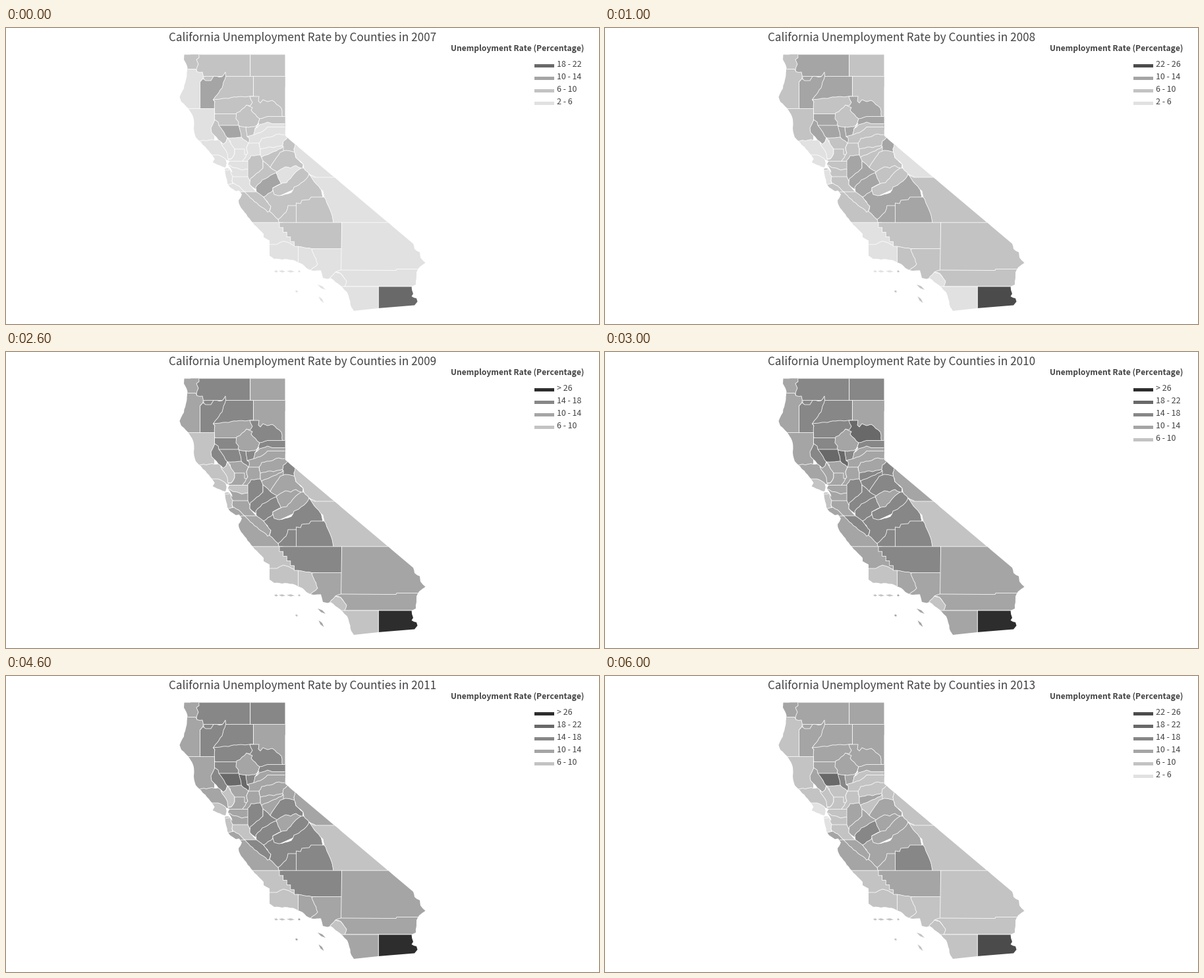
Animation, 900 px wide and 450 px high, one loop 7000 ms. Source, as a matplotlib script:

```python
import math
import random

import matplotlib.pyplot as plt
from matplotlib.animation import FuncAnimation
from matplotlib.patches import Polygon, Rectangle

W, H, DPI = 900, 450, 100
PX = 72 / DPI  # points per pixel
FONT = "Noto Sans CJK JP"
INK = "#444444"
FIRST_YEAR, YEARS = 2007, 7
CLIMB = (0, 0.3, 0.85, 1)   # from the first rate to the peak
EASING = (0, 0.2, 0.6, 1)   # from the peak to the last rate

rng = random.Random(4)
fig = plt.figure(figsize=(W / DPI, H / DPI), dpi=DPI, facecolor="white")
ax = fig.add_axes([0, 0, 1, 1])
ax.set(xlim=(0, W), ylim=(H, 0))
ax.axis("off")


def pairs(flat):
    return list(zip(flat[::2], flat[1::2]))


def rough(points):
    """Wrinkle natural borders; surveyed (upright, level, long) ones stay straight."""
    out = []
    for (x0, y0), (x1, y1) in zip(points, points[1:] + points[:1]):
        dx, dy = x1 - x0, y1 - y0
        size = math.hypot(dx, dy)
        out.append((x0, y0))
        if dx and dy and size < 30:
            n = int(size // 4)
            for k in range(1, n):
                d = rng.uniform(-0.7, 0.7) / size
                out.append((x0 + dx * k / n - dy * d, y0 + dy * k / n + dx * d))
    return out


def box(x0, y0, x1, y1):
    return x0, y0, x1, y0, x1, y1, x0, y1


def stairs(x0, y0, x1, y1, n):
    flat = []
    for k in range(n):
        x, y = x0 + (x1 - x0) * k / n, y0 + (y1 - y0) * k / n
        flat += [x, y, x + (x1 - x0) / n, y]
    return flat


NORTH_COAST = (423.5, 40.5, 270.5, 40.5, 270, 48, 275.5, 60, 273, 79, 270, 92,
               263.5, 105, 266, 112, 277, 122.5, 284, 135, 285.5, 147, 285, 152,
               288, 166, 296, 173.5, 305, 184, 313, 193, 317, 199, 314, 204,
               325, 209, 333, 212)
BAY = (335, 206, 333, 200, 340, 202, 337, 207, 341, 213, 344, 221, 337, 213,
       332.5, 214)
CENTRAL_COAST = (333, 222, 336, 236, 340, 242, 349, 248, 354, 247, 358, 253,
                 353, 262, 355, 270, 362, 280, 375, 296, 384, 306, 391, 313,
                 391, 318, 400, 323, 400, 346, 407, 351, 435, 352.5)
SOUTH_COAST = (450, 359, 456, 365, 467, 369, 478, 368.5, 481, 380, 488, 381.5,
               493, 380, 511, 394.5, 518, 402, 522.5, 416, 524, 424, 528, 430)
EAST = (565, 426, 620, 421.5, 624.5, 416, 623, 411, 615.5, 408, 618, 404,
        615.5, 393, 622, 390, 623, 371, 627, 364, 636.5, 357, 629, 349,
        628, 341, 620, 336, 618, 328, 423.5, 164)

state = Polygon(rough(pairs(NORTH_COAST + BAY + CENTRAL_COAST + SOUTH_COAST
                            + EAST)), fc="none", ec="none")
ax.add_patch(state)
areas = []


def county(rates, *flat):
    """Rates are the first, peak and last percentages.

    Outlines may run past the coast or under counties added later.
    """
    patch = Polygon(rough(pairs(flat)), ec="white", lw=0.8 * PX,
                    joinstyle="round", snap=False)
    ax.add_patch(patch)
    patch.set_clip_path(state)
    areas.append((patch, rates))


def island(rates, x, y, dx, dy):
    """A lens about (x, y) with half axis (dx, dy)."""
    k = 1.7 / math.hypot(dx, dy)
    patch = Polygon([(x - dx, y - dy), (x + dy * k, y - dx * k),
                     (x + dx, y + dy), (x - dy * k, y + dx * k)], lw=0)
    ax.add_patch(patch)
    areas.append((patch, rates))


# Rate histories shared by several counties
HARD = (9, 17, 13)
LATE = (7, 15, 11)
STEADY = (7, 13, 11)
FOOTHILL = (5, 11.5, 7)
METRO = (5, 12, 9)
MILD = (5, 10.5, 8.5)
LOW = (4, 10.5, 8.5)
COASTAL = (4, 9, 7)
RICH = (4, 8.5, 5.5)
RISEN = (5, 13, 11)

# North
county(HARD, *box(280, 30, 370.7, 90))
county((7, 15, 13.5), *box(370.7, 30, 430, 90))
county(HARD, *box(300, 73.5, 375.5, 115))
county(STEADY, *box(375.5, 73.5, 430, 150))
county(STEADY, 260, 30, 294, 30, 293, 45, 289, 48, 292, 55, 289, 63, 290, 70,
       260, 70)
county(FOOTHILL, 250, 62.5, 288, 62.5, 290, 66.5, 298, 67, 299, 77, 294.5, 82,
       294.5, 130, 250, 130)
county((10.5, 17, 13), 294.5, 82, 299, 77, 303, 80, 311, 80, 315, 73.5, 328, 74,
       333, 67, 333.5, 73.5, 328, 91, 318, 104, 314.5, 109, 317, 112, 317, 130,
       294.5, 130)
county(LATE, 317, 112, 314.5, 109, 325, 108, 350, 105, 376, 104, 376, 140,
       316.5, 140)
county((9, 18.5, 13.5), 370, 104, 384, 104, 383, 111, 386, 114, 390, 109,
       397, 112, 404, 110, 418, 122, 420, 145, 365, 145, 365, 118, 371, 118,
       374, 113)
county(MILD, *box(250, 122.5, 316.5, 180))
county(HARD, *box(316.5, 130.5, 360, 155))
county(STEADY, 365, 117, 374, 121, 372, 125, 385, 138, 383, 144, 377, 155,
       353.5, 155, 353, 143, 349, 138, 350, 129, 355, 127)
county(HARD, 385, 138, 397, 134.5, 430, 134.5, 430, 155, 383, 155, 383, 144)

# Central valley and foothills
county((11, 19, 18.2), 318, 148, 353.5, 148, 360, 160, 360, 172, 336, 172)
county((9, 16, 12), 317, 139.5, 322, 143, 323, 148, 336, 167, 334, 173, 330, 180,
       318, 180, 322, 170, 312, 159, 311, 152, 314, 146)
county(HARD, 364, 150.5, 377, 150, 384, 145, 378, 153, 378, 172, 364, 172)
county((9, 19, 15), 353.5, 149, 364, 150.5, 366, 165, 370, 167, 370, 180,
       357, 175, 356, 158)
county(FOOTHILL, 376, 161, 378, 153, 385, 147, 397, 143, 404, 145.5, 430, 145.5,
       430, 170, 376, 170)
county(FOOTHILL, 366, 165, 386, 159, 397, 150.5, 430, 150.5, 430, 180, 368, 180,
       369, 167)
county(METRO, 384, 175, 388, 168, 400, 166, 414, 161, 430, 163, 430, 190,
       386, 190)
county(LOW, 280, 173.5, 308, 170.5, 322, 170, 330, 177, 338, 177, 338, 205,
       280, 205)
county(METRO, 336, 167, 357, 166, 368, 175, 365, 182, 367, 190, 364, 198,
       350, 198, 340, 171)
county((4, 10.2, 8), 326, 174, 330, 176.5, 334, 173, 336, 167, 347, 184, 347, 191,
       342, 199, 337, 199, 336, 191)
county(METRO, 347, 184, 362, 184, 362, 192, 367, 193, 367, 210, 337, 210,
       337, 200, 342, 199, 347, 191)
county(METRO, 368, 175, 384, 175, 386, 184, 386, 198, 372, 200, 367, 204,
       358, 204, 367, 190, 365, 182)
county((5.5, 14.2, 11), 386, 184, 398, 181, 406, 182, 421, 178, 421, 200, 386, 200)
county((9, 15, 9), 420, 178, 421, 172, 430, 164, 445, 180, 437, 184, 439, 195,
       420, 195)
county((8, 14.5, 9.5), 388, 196, 402, 190, 418, 183, 421, 180, 421, 195, 405, 220,
       388, 210)
county(LATE, 401, 212, 405, 205, 416, 189, 424, 186, 439, 189, 440, 197, 451, 207,
       452, 225, 405, 225)
county((4, 10.4, 9.9), 437, 184, 439, 175, 450, 170, 510, 227, 505, 235, 463, 235,
       452, 213, 451, 207, 440, 197)

# Bay area
county(RICH, 305, 193, 322, 193, 333, 199, 336, 205, 334, 213, 305, 215)
county(MILD, *box(335, 202.5, 368, 230))
county(FOOTHILL, 335, 207, 344, 212, 351, 213, 358, 216, 370, 213, 370, 232,
       338, 232)
county(RICH, 325, 213, 338, 213, 345, 227, 343, 232, 346, 240, 325, 245)
county((5, 9, 5.5), *box(325, 213, 338, 216))
county((5.8, 10.8, 6.5), 344, 226, 367, 226, 371, 229, 370, 238, 380, 249,
       375, 260, 360, 255, 345, 240, 343, 232)
county(RISEN, 335, 239, 346, 236, 353, 240, 362, 249, 358, 251, 340, 255)
county(HARD, 367, 201, 372, 194, 386, 193, 390, 202, 390, 220, 371, 235, 367, 226)
county(HARD, 371, 229, 390, 213, 390, 202, 401, 212, 415, 220, 385, 250, 370, 238)
county((11, 17, 14.5), 379, 242, 389, 231, 410, 220, 419, 236, 405, 243, 405, 260,
       390, 262, 380, 249)

# Sierra, southern valley and coast
county(RISEN, 410, 220, 424, 211, 432, 213, 440, 209, 448, 213, 443, 230, 419, 240,
       413, 228)
county((7, 15, 13.5), 405, 243, 419, 236, 426, 235, 437, 222, 448, 213, 452, 213,
       460, 222, 460, 235, 405, 260)
county(STEADY, 340, 251, 362, 249, 400, 260, 420, 300, 340, 300)
county(LATE, 362, 249, 380, 249, 391, 257, 402, 271, 400, 278, 397, 280, 391, 274,
       377, 264)
county(HARD, 391, 257, 405, 247, 407, 253, 414, 255, 433, 250, 437, 242, 444, 239,
       456, 229, 460, 222, 475, 230, 490, 300, 415, 300, 413, 291, 400, 279,
       402, 271)
county(HARD, 413, 291, 425, 280, 428, 270, 450, 270, 450, 300, 415, 300)
county((9, 17, 15), 440.5, 266, 447, 267, 449, 262, 460, 261, 463, 257, 490, 257,
       500, 300, 440.5, 300)
county((5, 9, 7), 460, 222, 468, 227, 505, 227, 600, 300, 497, 300, 494, 282,
       483, 257, 481, 248, 468, 234)
county((4, 10.2, 8), 365, 295.8, 420, 295.8, 450, 335, 360, 335)

# South
county(COASTAL, 395, 329, 411, 329, 421, 324, 443, 332, 450, 332, 444, 360,
       395, 360)
county(MILD, *box(443.5, 332, 475, 372))
county(METRO, 464, 336, 473, 359, 462, 368, 470, 390, 510, 390, 515, 330)
county((7, 16, 11.5), 415, 295.8, 509.5, 295.8, 509.5, 335.5, 464, 335.5,
       *stairs(443, 332, 415, 296, 5))
county(METRO, 509.5, 295.8, 590, 295.8, 650, 350, 640, 375, 508.5, 375)
county(COASTAL, 491, 381, 500, 371, 508, 373, 518, 385, 514, 400, 490, 400)
county(METRO, 508, 368, 592, 368.5, 593, 366.5, 640, 366.5, 640, 393, 514, 393,
       517, 385, 508, 373, 500, 371)
county(LOW, *box(505, 393, 565.3, 440))
county((20, 29, 25.5), *box(565.3, 393, 640, 440))

for x, half in ((410, 3), (419, 5), (432, 6)):
    island(COASTAL, x, 370, half, 0.4)
island(MILD, 445, 370, 2, 0.4)
island(MILD, 441, 400.5, 2, 1)
island(METRO, 479, 394, 6, 4)
island(METRO, 478.5, 413, 4, 5)


def label(x, baseline, size, text="", **kw):
    return ax.text(x, baseline, text, fontsize=size * PX, family=FONT,
                   color=INK, va="baseline", **kw)


title = label(450, 20, 17.1, ha="center")
label(877.5, 35, 12, "Unemployment Rate (Percentage)", ha="right",
      weight="bold")
rows = []
for n in range(6):
    bar = ax.add_patch(Rectangle((802, 55 + 19 * n), 30, 5, lw=0))
    rows.append((bar, label(836, 59.3 + 19 * n, 12.4)))


def level(rates, i):
    """Class of a county in year i; each class spans four percent from 2."""
    first, peak, last = rates
    top = CLIMB[i] if i < 3 else 1
    rate = first + (peak - first) * top
    if i >= 3:
        rate += (last - peak) * EASING[i - 3]
    return min(int((rate - 2) // 4), 6)


def grey(k):
    return ((225 - 30 * k) / 255,) * 3


def span(k):
    return "> 26" if k == 6 else f"{2 + 4 * k} - {6 + 4 * k}"


def update(i):
    now = [level(rates, i) for _, rates in areas]
    for (patch, _), k in zip(areas, now):
        patch.set_facecolor(grey(k))
    title.set_text(
        f"California Unemployment Rate by Counties in {FIRST_YEAR + i}")
    present = sorted(set(now), reverse=True)
    for n, (bar, text) in enumerate(rows):
        shown = n < len(present)
        bar.set_visible(shown)
        text.set_visible(shown)
        if shown:
            bar.set_facecolor(grey(present[n]))
            text.set_text(span(present[n]))
    return []


anim = FuncAnimation(fig, update, frames=YEARS, interval=1000,
                     repeat=True, repeat_delay=0)
plt.show()
```
